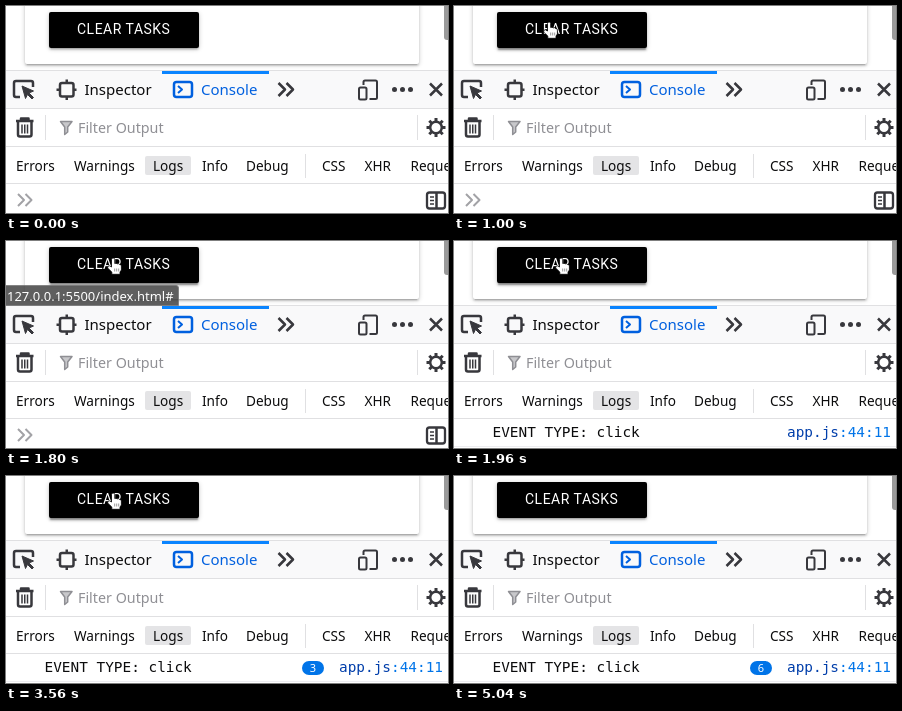
These frames come from a looping animation (442 px wide and 207 px high, 5920 ms). An HTML page:

```html
<!DOCTYPE html>
<html lang="en">
<head>
<meta charset="utf-8">
<title>Click event console</title>
<style>
  html, body { margin: 0; width: 100%; height: 100%; overflow: hidden; background: #fff; }
  #stage { position: absolute; left: 0; top: 0; width: 442px; height: 207px; overflow: hidden; }
  #stage > * { position: absolute; }
  #card { left: 19px; top: -40px; width: 394px; height: 98px; border-radius: 2px;
    box-shadow: 0 2px 2px rgba(0,0,0,.14), 0 3px 1px -2px rgba(0,0,0,.12), 0 1px 5px rgba(0,0,0,.2); }
  #button { left: 43px; top: 6px; width: 150px; height: 36px; border-radius: 2px; background: #000;
    color: #fff; font: 14px/34px Roboto, sans-serif; letter-spacing: .5px; text-indent: 28px; white-space: nowrap; }
  #bar { left: 438px; top: -10px; width: 8px; height: 44px; border-radius: 3px; background: #9a9a9a; }
  svg { left: 0; top: 0; }
  text { font: 13.6px "Noto Sans", "Open Sans", sans-serif; fill: #0c0c0d; white-space: pre; }
  .tab { font-size: 15px; }
  .mono { font: 14.4px "DejaVu Sans Mono", monospace; }
  .icon { fill: none; stroke: #38383d; stroke-width: 2.5; stroke-linejoin: round; }
</style>
</head>
<body>
<div id="stage">
  <div id="card"></div>
  <div id="button">CLEAR TASKS</div>
  <div id="bar"></div>
  <svg width="442" height="207">
    <!-- panel rows -->
    <path fill="#f9f9fa" d="M0 64h442v39H0z"/>
    <path fill="#fff" d="M0 103h442v104H0z"/>
    <path fill="none" stroke="#e0e0e2" d="M0 64.5h442M0 102.5h442M0 140.5h442M0 177.5h442M39.5 109v25M411.5 109v25M299.5 148v24"/>
    <path fill="#0a84ff" d="M156 65h107v3H156z"/>
    <rect x="139" y="150" width="46" height="19" rx="2" fill="#e4e4e6"/>

    <!-- tab bar -->
    <g class="icon">
      <path d="M14 91h-4a2 2 0 0 1-2-2V77a2 2 0 0 1 2-2h15a2 2 0 0 1 2 2v4"/>
      <path fill="#38383d" stroke-width="1" d="M16 80l11.5 5-4.5 2 4.5 4.5-1.5 1.5-4.5-4.5-2 4z"/>
      <rect x="54" y="77" width="13.500" height="13.500" rx="2"/>
      <path d="M60.750 77v-3.500M60.750 90.500v3.500M54 83.750h-3.500M67 83.750h3.500"/>
      <g stroke="#0060df">
        <rect x="168" y="76" width="18" height="15" rx="2.500"/>
        <path d="M172 80l4 3.500-4 3.500" stroke-width="2"/>
      </g>
      <path d="M272.500 77l6.500 6.500-6.500 6.500M280.500 77l6.500 6.500-6.500 6.500"/>
      <path d="M357.500 79v-3a1.500 1.500 0 0 1 1.500-1.500h10.500a1.500 1.500 0 0 1 1.500 1.500v15.500a1.500 1.500 0 0 1-1.500 1.500h-6" stroke-width="2"/>
      <rect x="353" y="81.500" width="7.500" height="12" rx="1.500" stroke-width="2"/>
      <path d="M424 77.500l12 12M436 77.500l-12 12"/>
    </g>
    <g fill="#38383d"><circle cx="388.500" cy="83.500" r="2.500"/><circle cx="396.500" cy="83.500" r="2.500"/><circle cx="404.500" cy="83.500" r="2.500"/></g>
    <text class="tab" x="78.500" y="89">Inspector</text>
    <text class="tab" x="195" y="89" style="fill:#0060df">Console</text>

    <!-- filter row -->
    <g class="icon">
      <path d="M10 115h17.500M15 114.500V112.500h7.500v2M12 116v12.500a2 2 0 0 0 2 2h9.500a2 2 0 0 0 2-2V116"/>
      <path d="M16 118.500v9M18.750 118.500v9M21.500 118.500v9" stroke-width="1.500"/>
      <path d="M54.500 115.500h11.500l-4.300 5.500v5l-3 2.500V121z" fill="#c8c8cb" stroke="#8f8f94" stroke-width="1.500"/>
      <circle cx="430" cy="121.500" r="5.800"/>
      <path id="teeth" stroke-width="3"/>
    </g>
    <text x="72" y="127" style="font-size:14.300px;fill:#8f8f94">Filter Output</text>

    <g id="filters"></g>

    <!-- prompt -->
    <g id="prompt" class="icon">
      <path stroke="#a2a2a6" stroke-width="2" d="M12 188l6 6-6 6M19.500 188l6 6-6 6"/>
      <rect x="421" y="186.500" width="18" height="16" rx="2.500" stroke-width="2.300"/>
      <path d="M430.500 187v15"/>
      <path d="M424 191h4M424 194.500h4M424 198h4" stroke-width="1.500"/>
    </g>

    <!-- logged row -->
    <g id="log">
      <path d="M0 205.500h442" stroke="#ededf0"/>
      <text class="mono" x="38.500" y="196">EVENT TYPE: click</text>
      <text class="mono" x="333" y="196" style="fill:#003eaa">app.js<tspan fill="#0074e8">:44:11</tspan></text>
      <g id="badge">
        <rect x="296" y="185" width="22" height="14" rx="7" fill="#0074e8"/>
        <text id="count" x="307" y="196" text-anchor="middle" style="font-size:11px;fill:#fff"></text>
      </g>
    </g>

    <g id="status">
      <path fill="#3d3d3d" stroke="#6a6a6a" d="M-1 44.500h171a2.500 2.500 0 0 1 2.500 2.500v17.500H-1z"/>
      <text x="1" y="60" style="font-size:13px;fill:#fff">127.0.0.1:5500/index.html#</text>
    </g>

    <g id="cursor" fill="#fff" stroke="#000" stroke-linejoin="round">
      <g id="hand">
        <path stroke-width=".8" d="M3.500 9V1.500a1.500 1.500 0 0 1 3.200 0V5.500q1.400-.8 2.500.3 1.400-.6 2.300.6 1.900-.2 1.900 1.600v4l-1.400 2v2.300H3.800v-2.300L-.4 10Q-.6 7.600 1.400 7.800z"/>
        <path d="M6.700 10.500v3M8.700 10.500v3M10.700 10.500v3" stroke-width=".4"/>
      </g>
      <path id="arrow" d="M.5.5v13.500l3-2.800 2.200 5 2.200-1-2.200-4.700h4.300z"/>
    </g>
  </svg>
</div>
<script>
const $ = id => document.getElementById(id);
const LOOP = 5920, STEP = 40;

// time, x, y of the pointer
const path = [
  [560, 72, -18], [1000, 90, 16], [1120, 90, 16], [1280, 102, 17],
  [4160, 102, 17], [4440, 84, 13], [4720, 50, -1], [5040, 44, -18]
];
const clickTimes = [1840, 2800, 3560, 3760, 3960, 4160];
const labels = [["Errors", 10], ["Warnings", 68], ["Logs", 147], ["Info", 196],
  ["Debug", 240], ["CSS", 316], ["XHR", 358.5], ["Requests", 404.5]];

$("filters").innerHTML = labels.map(([name, x]) => `<text x="${x}" y="165">${name}</text>`).join("");

let teeth = "";
for (let i = 0; i < 8; i++) {
  const c = Math.cos(i * Math.PI / 4), s = Math.sin(i * Math.PI / 4);
  teeth += `M${430 + 6 * c} ${121.5 + 6 * s}L${430 + 9.5 * c} ${121.5 + 9.5 * s}`;
}
$("teeth").setAttribute("d", teeth);

const ramp = (t, from, to) => Math.min(1, Math.max(0, (t - from) / (to - from)));
const mix = (a, b, k) => a + (b - a) * k;
const show = (id, on) => $(id).style.display = on ? "" : "none";

function pointerAt(t) {
  const i = path.findIndex(p => p[0] > t);
  if (i < 1) return path[i < 0 ? path.length - 1 : 0].slice(1);
  const [t0, x0, y0] = path[i - 1], [t1, x1, y1] = path[i];
  const k = ramp(t, t0, t1);
  return [mix(x0, x1, k), mix(y0, y1, k)];
}

function draw(t) {
  const [x, y] = pointerAt(t).map(Math.round);
  $("cursor").setAttribute("transform", `translate(${x} ${y})`);
  show("hand", y >= 6);
  show("arrow", y < 6);

  // the shadow below the button deepens while hovered
  const hover = ramp(t, 800, 1000) - ramp(t, 4520, 4720);
  $("button").style.boxShadow =
    `0 ${2 + hover}px 2px rgba(0,0,0,.14), 0 3px 1px -2px rgba(0,0,0,.12),` +
    `0 1px 5px rgba(0,0,0,.2), 0 3px 1px -1px rgba(0,0,0,${.2 * hover})`;

  $("status").setAttribute("opacity", ramp(t, 1280, 1440) - ramp(t, 1766, 1960));

  const clicks = clickTimes.filter(c => c <= t).length;
  show("prompt", !clicks);
  show("log", clicks);
  show("badge", clicks > 1);
  $("count").textContent = clicks;
}

const start = performance.now();
function tick() {
  const t = (performance.now() - start) % LOOP;
  draw(Math.floor(t / STEP) * STEP);
  requestAnimationFrame(tick);
}
tick();
</script>
</body>
</html>
```
